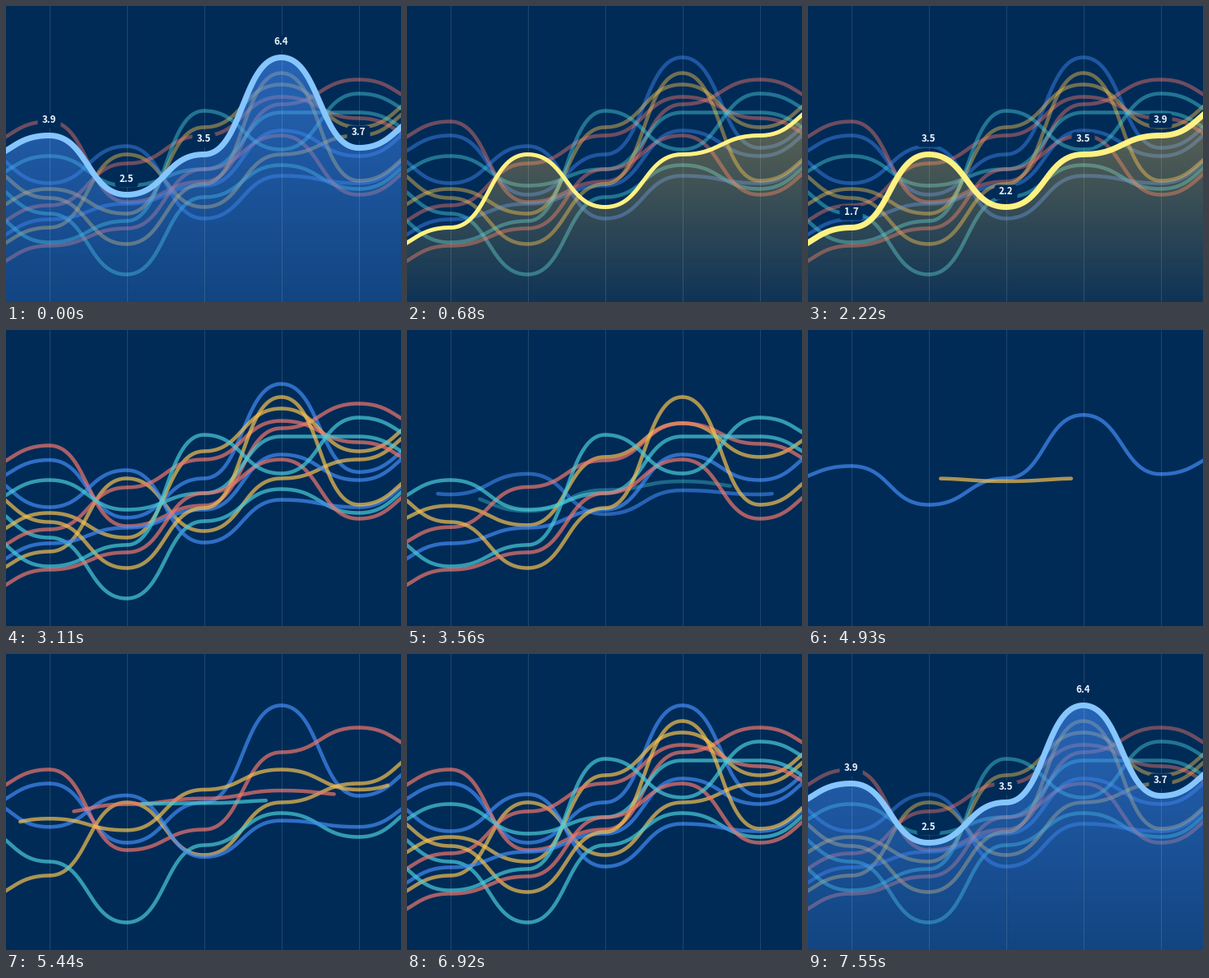
A matplotlib script for the animation above (8050 ms loop, 480 by 360 pixels).

```python
import numpy as np
import matplotlib.pyplot as plt
from matplotlib.animation import FuncAnimation
from matplotlib.colors import to_rgb
from matplotlib.patches import FancyBboxPatch, Polygon

W, H, DPI = 480, 360, 100
LOOP, STEP = 8050, 25
PX = 72 / DPI
FLAT = 180          # every line grows from this height
GAP = 94
COLUMNS = 52 + GAP * np.arange(5)
BG = "#002b57"
COLORS = ["#428bf5", "#f6c150", "#f0776b", "#4acbda"]   # blue, yellow, red, teal

# line heights at the five columns, colours taken in turn
HEIGHTS = np.array([
    [157, 229, 180, 62, 172], [269, 180, 244, 180, 157],
    [140, 238, 213, 119, 89], [252, 326, 232, 193, 222],
    [215, 170, 258, 206, 215], [222, 252, 147, 95, 147],
    [242, 191, 157, 110, 136], [182, 218, 198, 129, 129],
    [259, 240, 218, 151, 182], [233, 289, 216, 81, 212],
    [291, 270, 198, 157, 229], [287, 261, 127, 174, 106],
], float)
COUNT = len(HEIGHTS)


def ramp(v):
    return min(max(v, 0.0), 1.0)


def beyond(heights, higher):
    """Heights one column off stage: some lines come from above, others below."""
    return heights + np.where(np.isin(np.arange(COUNT), higher), -42, 30)


def curves():
    """Join the points with S-shaped Bezier pieces, level at each point."""
    rows = np.column_stack([beyond(HEIGHTS[:, 0], [3, 4, 9, 11]), HEIGHTS,
                            beyond(HEIGHTS[:, -1], [0, 1, 3, 4, 5, 8, 9, 10])])
    starts = COLUMNS[0] + GAP * np.arange(-1, 5)
    u = np.linspace(0, 1, 40, endpoint=False)
    bx = 1.5 * u * (1 - u) + u ** 3
    by = u * u * (3 - 2 * u)
    x = (starts[:, None] + GAP * bx).ravel()
    lo, hi = rows[:, :-1, None], rows[:, 1:, None]
    return x, (lo + (hi - lo) * by).reshape(COUNT, -1)


X, Y = curves()

fig = plt.figure(figsize=(W / DPI, H / DPI), dpi=DPI, facecolor=BG)
ax = fig.add_axes([0, 0, 1, 1])
STAGE = (-0.5, W - 0.5, H - 0.5, -0.5)
ax.axis(STAGE)
ax.axis("off")

for gx in COLUMNS:
    ax.plot([gx, gx], [-1, H], color="white", lw=PX, alpha=0.13, zorder=3)

lines = [ax.plot([], [], color=COLORS[i % 4], lw=4.5 * PX, alpha=0.7,
                 solid_capstyle="round", zorder=1)[0] for i in range(COUNT)]


class Focus:
    """Highlighted line with a gradient area and value labels."""

    def __init__(self, row, on, off, color, glow, values):
        self.on, self.span = on, (off - on) % LOOP
        y = Y[row]
        self.line, = ax.plot(X, y, color=color, zorder=5)
        area = Polygon(np.vstack([np.c_[X, y], [X[-1], H], [X[0], H]]),
                       fc="none", ec="none")
        ax.add_patch(area)
        top = y[(X >= 0) & (X <= W)].min()
        rgba = np.ones((H, 2, 4))
        rgba[..., :3] = to_rgb(COLORS[row % 4])
        rgba[..., 3] = np.interp(np.arange(H), [top, H], glow)[:, None]
        self.fill = ax.imshow(rgba, extent=STAGE, aspect="auto", zorder=2)
        self.fill.set_clip_path(area)
        self.labels = [self.label(*p) for p in zip(COLUMNS, HEIGHTS[row], values)]

    @staticmethod
    def label(x, y, value):
        box = FancyBboxPatch((x - 11, y - 24), 22, 12, fc=BG, ec="none", zorder=4,
                             boxstyle="round,pad=3,rounding_size=4")
        ax.add_patch(box)
        text = ax.text(x, y - 15.5, f"{value:.1f}", color="#eef4fa", ha="center",
                       va="baseline", fontsize=11.5 * PX, weight="bold",
                       family="Noto Sans CJK JP", zorder=6)
        return box, text, y - 15.5

    def update(self, t):
        age = (t - self.on) % LOOP
        fade = 1 - ramp((age - self.span) / 100)
        level = ramp(age / 80) * fade
        for part in (self.line, self.fill):
            part.set_visible(level > 0)
            part.set_alpha(level)
        self.line.set_linewidth((4.5 + 2.5 * ramp((age - 60) / 160)) * PX)
        for k, (box, text, base) in enumerate(self.labels):
            pop = 1 - (1 - ramp((age - 150 - 70 * k) / 200)) ** 2
            for part in (box, text):
                part.set_visible(pop * fade > 0)
                part.set_alpha(pop * fade)
            text.set_y(base + 6 * (1 - pop))
        return level


focuses = [
    Focus(0, 6905, 490, "#86c6ff", (0.6, 0.27), [3.9, 2.5, 3.5, 6.4, 3.7]),
    Focus(1, 590, 2205, "#fff182", (0.38, 0.06), [1.7, 3.5, 2.2, 3.5, 3.9]),
]


def pose(i, t):
    """Height scale, half width and opacity of line i."""
    if t < 4450:
        e = ramp((t - 3072 - 73 * i) / 320)
        half = 260 - 108 * ramp((e - 0.46) / 0.23)
        return 1 - e ** 1.5, half * (e < 1), 1 - 0.7 * ramp((e - 0.46) / 0.54)
    e = ramp((t - 4688 - 930 * (i / (COUNT - 1)) ** 0.69) / 300)
    return e ** 1.8, 260 * np.sin(e * np.pi / 2), 1


def draw(n):
    t = n * STEP
    level = max(f.update(t) for f in focuses)
    base = 0.7 - 0.24 * level
    for i, line in enumerate(lines):
        scale, half, alpha = pose(i, t)
        line.set_visible(half > 0)
        if half > 0:
            x = np.clip(X, W / 2 - half, W / 2 + half)
            y = np.interp(x, X, Y[i])
            line.set_data(x, FLAT + (y - FLAT) * scale)
            line.set_alpha(base * alpha)
    return lines


anim = FuncAnimation(fig, draw, frames=LOOP // STEP, interval=STEP,
                     repeat=True, repeat_delay=0, cache_frame_data=False)
plt.show()
```
